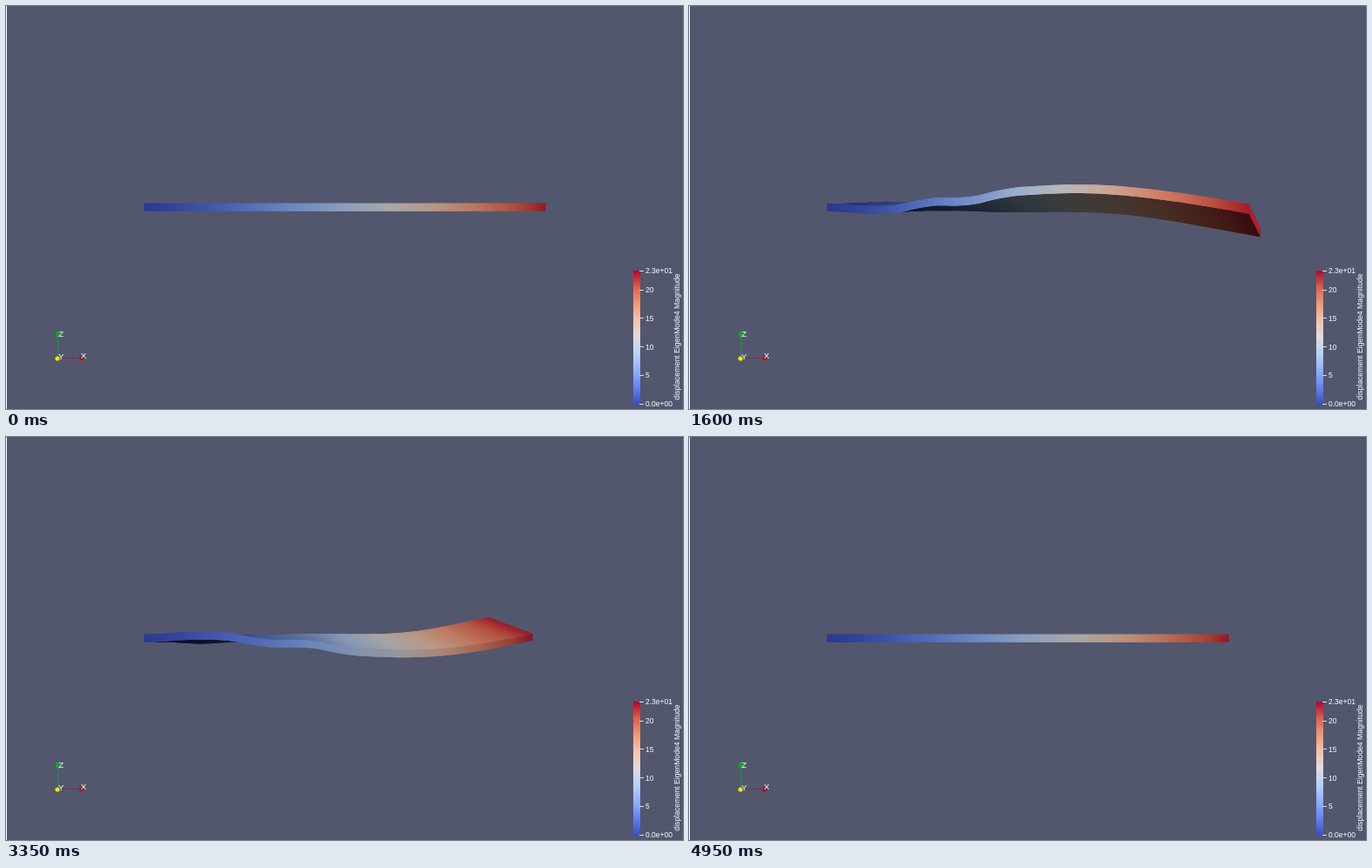
Animation, 776 px wide and 463 px high, one loop 5000 ms. Source, as an HTML page with a canvas:

```html
<!DOCTYPE html>
<html lang="en">
<head>
<meta charset="utf-8">
<title>Eigenmode animation</title>
<style>
  html, body { margin: 0; width: 100%; height: 100%; overflow: hidden; background: #52576e; }
  canvas, svg { position: absolute; left: 0; top: 0; }
  text { font-family: "Liberation Sans", Arial, sans-serif; fill: #fff; }
</style>
</head>
<body>
<canvas id="stage" width="776" height="463"></canvas>
<svg width="776" height="463">
  <defs><linearGradient id="scale" x1="0" y1="1" x2="0" y2="0"></linearGradient></defs>
  <rect width="1" height="463" fill="#fff"/>
  <g fill="none" stroke-width="1">
    <path d="M59.5 405V380" stroke="#2a8c46"/>
    <path d="M59 404.5H86" stroke="#7a3248"/>
  </g>
  <path d="M57 380.5L57.5 374.5Q59.5 372 61.5 374.5L62 380.5Z" fill="#0aaa1c"/>
  <path d="M84.5 402L91 404.7L84.5 408Z" fill="#b00c14"/>
  <circle cx="59" cy="405" r="2.6" fill="#f0e800"/>
  <g font-size="9.5">
    <text x="60.3" y="379.8">Z</text>
    <text x="60" y="405.5">Y</text>
    <text x="85.7" y="405.3">X</text>
  </g>
  <rect x="719" y="304" width="8" height="154" fill="url(#scale)"/>
  <g id="ticks" font-size="8.5"></g>
  <text transform="translate(771.5 380) rotate(-90)" text-anchor="middle" font-size="8.7">displacement EigenMode4 Magnitude</text>
</svg>
<script>
const ctx = document.getElementById('stage').getContext('2d');
const TAU = 2 * Math.PI, FRAME = 50, FRAMES = 100, SEGMENTS = 150;
const CX = 388, CY = 231.2, LENGTH = 461, HALF_HEIGHT = 4.5;

const coolWarm = [[59, 76, 192], [98, 130, 234], [141, 176, 254], [184, 208, 249], [221, 221, 221],
  [245, 196, 173], [244, 152, 122], [222, 96, 77], [180, 4, 38]];

// Vertical mode shape of each long edge, sampled evenly from clamp to tip
const front = {
  depth: 1, shift: 32,
  lift: [0, -1.3, -3.4, -3.7, -1.5, 4.3, 8, 7.8, 10, 16.4, 21, 22.8, 24, 24.2, 23.3, 21.1, 17.8, 13.8, 9, 3.8, -2]
};
const rear = {
  depth: 1.1154, shift: -20.2,
  lift: [0, 1.8, 3.2, 2.2, 0.3, 0, 0.1, -0.8, -1.9, -2, -1.7, -1.4, -1.6, -2.3, -4.1, -7.3, -11.6, -16.8, -22.4, -28.2, -34]
};

// Catmull-Rom interpolation through even samples
function spline(p, t) {
  const last = p.length - 1, i = Math.min(last - 1, Math.floor(t * last)), f = t * last - i;
  const b = p[i], c = p[i + 1], a = i ? p[i - 1] : b, d = p[i + 2] ?? 2 * c - b;
  return b + f / 2 * (c - a + f * (2 * a - 5 * b + 4 * c - d + f * (3 * (b - c) + d - a)));
}

function heat(v, light) {
  const i = Math.min(7, Math.floor(v * 8)), f = v * 8 - i;
  return `rgb(${coolWarm[i].map((c, k) => Math.min(255, Math.round(light * (c + (coolWarm[i + 1][k] - c) * f))))})`;
}

// Perspective projection of the top and bottom of one edge
function project(edge, t, amp) {
  const w = edge.depth + 0.239 * amp * t ** 1.8;
  const x = CX + (-230 + LENGTH * t + edge.shift * amp * t ** 0.8) / w;
  const z = amp * spline(edge.lift, t);
  return { top: [x, CY + (z - HALF_HEIGHT) / w], bottom: [x, CY + (z + HALF_HEIGHT) / w] };
}

function area(points) {
  return points.reduce((sum, [x, y], i) => {
    const [nx, ny] = points[(i + 1) % points.length];
    return sum + x * ny - nx * y;
  }, 0);
}

function face(points, color) {
  if (area(points) <= 0) return;
  ctx.beginPath();
  points.forEach(p => ctx.lineTo(...p));
  ctx.closePath();
  ctx.fillStyle = color;
  ctx.fill();
}

function drawBeam(amp) {
  ctx.clearRect(0, 0, 776, 463);
  const slices = Array.from({ length: SEGMENTS + 1 }, (_, i) => {
    const t = i / SEGMENTS;
    return {
      f: project(front, t, amp), r: project(rear, t, amp), value: 0.965 * t ** 1.32,
      tilt: amp * (spline(front.lift, t) - spline(rear.lift, t))
    };
  });
  // Each segment runs under the next one so that no seam shows
  const eachSegment = draw => {
    for (let i = 0; i < SEGMENTS; i++) draw(slices[i], slices[Math.min(i + 2, SEGMENTS)]);
  };
  eachSegment((a, b) => {
    const tilt = Math.abs(a.tilt);
    face([a.r.top, b.r.top, b.f.top, a.f.top], heat(a.value, 0.55 + 0.0095 * tilt));
    face([a.f.bottom, b.f.bottom, b.r.bottom, a.r.bottom], heat(a.value, 0.17 + 0.005 * tilt));
  });
  const tip = slices[SEGMENTS];
  face([tip.f.top, tip.r.top, tip.r.bottom, tip.f.bottom], heat(tip.value, 0.93));
  eachSegment((a, b) =>
    face([a.f.top, b.f.top, b.f.bottom, a.f.bottom], heat(a.value, 0.76 - 0.0035 * a.tilt)));
}

document.getElementById('scale').innerHTML = coolWarm.map((c, i) =>
  `<stop offset="${i / 8}" stop-color="rgb(${c})"/>`).join('');
document.getElementById('ticks').innerHTML =
  [['2.3e+01', 304], ['20', 326], ['15', 358.5], ['10', 391.5], ['5', 424], ['0.0e+00', 457]].map(([label, y]) =>
    `<path d="M726 ${Math.floor(y) + 0.5}h5" stroke="#dcdde2"/><text x="733" y="${y + 3}">${label}</text>`).join('');

const start = performance.now();
function tick() {
  const step = Math.floor((performance.now() - start) / FRAME) % FRAMES;
  drawBeam(Math.sin(2 * TAU * step / (FRAMES - 1)));
  requestAnimationFrame(tick);
}
tick();
</script>
</body>
</html>
```
